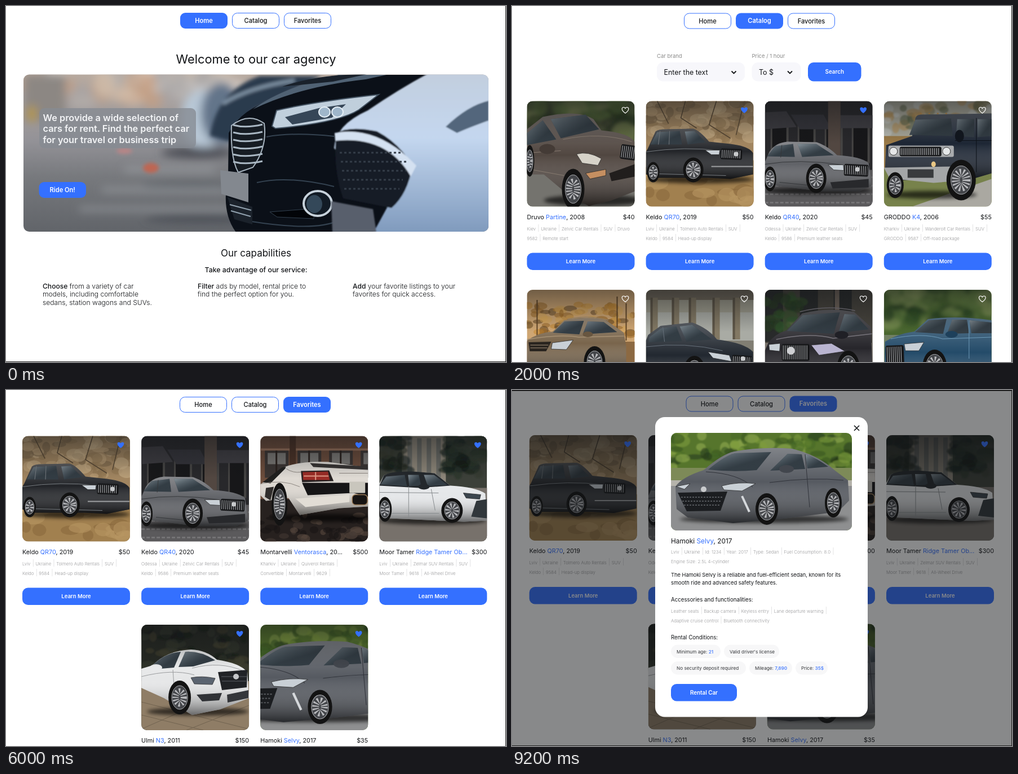
An HTML page that plays this animation: 887 px wide and 631 px high, repeating every 10000 ms.

```html
<!DOCTYPE html>
<html lang="en">
<head>
<meta charset="utf-8">
<title>Car agency</title>
<style>
html, body { margin: 0; width: 100%; height: 100%; overflow: hidden; background: #fff; }
svg { display: block; width: 100%; height: 100%; }
text { font-family: Inter, "Open Sans", sans-serif; fill: #121417; white-space: pre; }
.blue { fill: #3470ff; }
.white { fill: #fff; }
.grey { fill: #8a8a89; }
.tags { fill: #9a9a9c; font-weight: 300; }
.bar { fill: #d4d4d6; font-size: 11px; }
</style>
</head>
<body>
<svg id="stage" viewBox="0 0 887 631"></svg>
<script>
const BLUE = '#3470ff', INK = '#121417', STEP = 2000;

let seed = 7;
const rnd = () => (seed = seed * 16807 % 2147483647) / 2147483647;

// Basic shapes
const rect = (x, y, w, h, fill, r = 0, more = '') =>
  `<rect x="${x}" y="${y}" width="${w}" height="${h}" rx="${r}" fill="${fill}" ${more}/>`;
const path = (d, fill, more = '') => `<path d="${d}" fill="${fill}" ${more}/>`;
const line = (d, stroke, width = 1, more = '') =>
  path(d, 'none', `stroke="${stroke}" stroke-width="${width}" ${more}`);
const oval = (x, y, rx, ry, fill, more = '') =>
  `<ellipse cx="${x}" cy="${y}" rx="${rx}" ry="${ry}" fill="${fill}" ${more}/>`;
const text = (x, y, size, s, more = '') =>
  `<text x="${x}" y="${y}" font-size="${size}" ${more}>${s}</text>`;
const group = (s, more) => `<g ${more}>${s}</g>`;
const at = (x, y, s) => group(s, `transform="translate(${x} ${y})"`);
const soft = (s, b = 3) => group(s, `filter="url(#blur${b})"`);
const MID = 'text-anchor="middle" ', BOLD = 'font-weight="600" ', THIN = 'font-weight="300" ';

// Picture parts
const blobs = (n, x, y, w, h, size, colors) => Array.from({ length: n }, () =>
  oval(x + rnd() * w, y + rnd() * h, size * (.5 + rnd()), size * (.4 + rnd() * .6),
    colors[Math.floor(rnd() * colors.length)], 'opacity=".6"')).join('');
const body = (d, fill) => path(d, fill) + path(d, 'url(#shade)');
const wheel = (x, y, rx, ry) => oval(x, y, rx, ry, '#131313') +
  oval(x, y, rx * .7, ry * .7, '#44464a') +
  oval(x, y, rx * .36, ry * .36, 'none', `stroke="#b9babd" stroke-width="${rx * .55}" stroke-dasharray="2 2.6"`) +
  oval(x, y, rx * .7, ry * .7, 'none', 'stroke="#aaacb0"');
const slats = (x, y, w, h, tilt = 0, color = '#b5b7ba') => rect(x, y, w, h, '#17181a', 3, `transform="rotate(${tilt} ${x} ${y})"`) +
  line(`M${x + 2},${y + h / 2}h${w - 4}`, color, h - 5, `stroke-dasharray="1 2.5" transform="rotate(${tilt} ${x} ${y})"`);
const lamp = (d, fill = '#c9d0d6') => path(d, fill, 'stroke="#222" stroke-width=".7"');
const ground = (y, fill) => rect(0, y, 321, 187 - y, fill);
const shadow = (x, y, rx, ry = 7) => soft(oval(x, y, rx, ry, '#000', 'opacity=".65"'));
const glass = d => path(d, '#2b343b') + path(d, 'url(#shine)');

const sedan = rect(0, 0, 321, 173, '#56752c') +
  soft(blobs(90, 0, 0, 321, 62, 11, ['#7d9b3c', '#35551f', '#91aa50', '#476a27', '#263b1b']), 1) +
  rect(0, 62, 321, 34, '#7d8a58') + ground(92, '#8e8f90') + rect(0, 84, 321, 10, '#b5b3ab') +
  shadow(165, 153, 150) +
  body('M8,95Q20,78 58,66Q90,38 112,33Q160,24 215,28Q262,40 290,66L314,84L316,120L296,140L200,152L110,160L30,150L10,135Z', '#565a61') +
  glass('M66,65Q96,40 114,36L178,34L152,66Q110,70 66,65Z') +
  glass('M176,67L207,37L232,38L238,64Z') + glass('M242,63L238,38Q258,44 279,60Z') +
  line('M62,69Q120,72 145,96M175,88Q250,78 306,84M238,38L246,132', '#30333a') +
  lamp('M90,94Q120,86 150,90L126,103L94,101Z') + lamp('M9,95L34,90L24,100Z') +
  path('M12,106L100,104L88,138L28,139Z', '#1b1d20') +
  line('M18,114H92M20,121H90M23,128H87', '#53565a', 2, 'stroke-dasharray="3 2"') +
  oval(58, 100, 5, 5, '#c9cbcd') + line('M126,112L139,140', '#d5d8db', 4) +
  oval(205, 64, 13, 7, '#42464d') + wheel(170, 135, 20, 28) + wheel(288, 124, 15, 26);

const photos = {
  partine: rect(0, 0, 191, 187, '#4c5a36') +
    soft(blobs(35, 0, 0, 191, 60, 22, ['#23331c', '#58703a', '#2e3326', '#798052'])) +
    ground(120, '#74736e') + rect(0, 110, 191, 14, '#5d6341') + shadow(120, 176, 90, 10) +
    body('M0,50L28,28Q90,14 118,32L132,52Q180,56 191,72V160L150,176L110,186L78,170L30,130L0,130Z', '#514741') +
    glass('M42,32L104,24L128,50L60,66Z') + glass('M0,57L28,34L52,68L0,78Z') +
    line('M64,68Q130,54 186,72M0,92L60,88M0,120L66,132', '#877b70') +
    lamp('M88,94Q108,88 132,102L126,114L98,110Z', '#d6d2c8') + lamp('M104,128L140,121L140,132L112,138Z', '#c58f61') +
    slats(168, 76, 28, 26, 8) + path('M146,128L191,112V134L150,142Z', '#211e1d') +
    oval(36, 85, 14, 9, '#443b36') + wheel(82, 156, 20, 36) + wheel(5, 106, 8, 28),

  qr70: rect(0, 0, 191, 187, '#a18560') +
    blobs(65, 0, 0, 191, 72, 11, ['#bfa27b', '#7b6548', '#c7ae88', '#927753']) +
    line('M20,0L40,40M70,0L62,30L90,48M125,0L112,42L150,66M172,10L160,60', '#574733', 1.5) +
    ground(105, '#a1804f') + blobs(30, 0, 115, 191, 70, 15, ['#8a6a3e', '#b89663']) + shadow(96, 139, 95) +
    body('M3,85L17,54Q22,50 34,50L84,49Q95,52 112,72L150,76Q183,80 190,92V130L150,138L110,136L20,136L0,130V90Z', '#232529') +
    glass('M8,77L20,55L60,53L64,77Z') + glass('M69,54L86,53L106,73L74,77Z') +
    line('M25,53L22,77M42,53L41,77M0,90Q70,80 132,88M22,129L142,132', '#777c80') +
    lamp('M105,87L131,87L130,95L116,95Z') + slats(133, 84, 38, 19, 2) + oval(160, 94, 4, 4, '#c7c9cb') +
    line('M116,116H190', '#9d9fa1', 2) + wheel(13, 126, 11, 18) + wheel(84, 122, 18, 22),

  qr40: rect(0, 0, 191, 187, '#28282b') +
    [10, 58, 106, 154].map(x => rect(x, 42, 32, 68, '#454443') + rect(x + 3, 45, 25, 62, '#171719')).join('') +
    path('M0,20L38,18L56,46L0,50Z', '#3c3b40') + path('M46,24H104L118,50H62Z', '#34343a') + path('M122,25H191V48H132Z', '#3e3d42') +
    rect(112, 0, 22, 122, '#524741') + ground(122, '#5b5a5c') +
    line('M0,135H191M0,150H191M0,165H191M0,180H191', '#747375', 3, 'stroke-dasharray="6 3"') + shadow(95, 159, 95) +
    body('M0,108L8,90Q18,74 40,72L92,73Q112,80 128,96Q170,98 184,110L189,150L168,160L100,160L20,150L0,140Z', '#606267') +
    glass('M4,98L18,80L50,76L53,99Z') + glass('M58,76L91,76L122,96L66,99Z') +
    line('M0,112Q60,102 138,113M26,144L76,149M30,78L28,100', '#35373a') +
    lamp('M112,113L139,113L140,123L122,122Z') + slats(141, 111, 43, 21, 3) + oval(164, 121, 4, 4, '#c7c9cb') +
    path('M116,144L184,138V153L120,155Z', '#28292c') + wheel(9, 138, 11, 22) + wheel(91, 137, 18, 26),

  k4: rect(0, 0, 191, 187, '#aaa99b') +
    soft(blobs(60, 0, 0, 191, 58, 10, ['#7d7753', '#b08c51', '#596044', '#c3c6c3']), 1) +
    rect(0, 62, 191, 68, '#9a7a48') + ground(120, '#77824b') + path('M50,187L191,138V187Z', '#aaa8a1') + shadow(85, 166, 80) +
    body('M4,78L50,62L56,30Q58,24 66,24L191,22V128L150,140L20,140L2,120Z', '#1d2634') +
    glass('M45,60L56,33L119,31L122,62Z') + glass('M128,62L130,32L160,32V64Z') + glass('M166,64V32H191V62Z') +
    line('M64,22H118', '#c38b45', 2, 'stroke-dasharray="3 12"') + line('M126,70H191M164,30V126', '#0c1118') +
    rect(8, 79, 116, 20, '#a9abad', 3) + slats(28, 81, 74, 17, 0, '#d5d7d9') +
    [17, 111].map(x => oval(x, 89, 7, 7, '#e5e7e8', 'stroke="#333"')).join('') +
    path('M0,118L124,116L124,142L88,145L10,137Z', '#a4a6a7') + rect(42, 121, 46, 15, '#393b3d') +
    oval(88, 112, 4, 5, '#e9c684') + oval(134, 62, 8, 11, '#11161e') + wheel(20, 149, 15, 23) + wheel(137, 140, 26, 36),

  wagon: rect(0, 0, 191, 187, '#cfa673') +
    blobs(95, 0, 24, 191, 62, 8, ['#a06d2b', '#c78a35', '#6c4e28', '#d8a556']) + ground(92, '#8c6942') +
    line('M18,90V18M160,90V12M176,90V24', '#604526', 2) +
    body('M0,90Q20,76 46,74L66,54Q110,46 140,54L172,76L176,100V150H0Z', '#79654c') +
    glass('M46,76L67,56L101,55L93,79Z') + glass('M99,79L108,56L136,57L160,75Z') +
    line('M72,52Q110,44 144,54M0,88Q60,78 92,84L172,82', '#a69073', 1.5) +
    path('M3,93L43,92L34,109L5,109Z', '#29241f') + line('M6,98H38M6,103H36', '#a18e78') +
    lamp('M45,94L82,89L70,106L43,105Z') + oval(108, 79, 9, 5, '#685640') + wheel(120, 128, 19, 28),

  coast: rect(0, 0, 191, 187, '#9d9b8c') + rect(0, 40, 191, 50, '#a9aba4') + rect(0, 0, 191, 18, '#71695b') +
    [8, 46, 76, 118, 154].map(x => rect(x, 14, 13, 74, '#827863') + rect(x, 14, 4, 74, '#5d5547')).join('') +
    ground(90, '#817e73') +
    body('M4,80L26,64L82,58Q110,68 126,88Q175,94 190,110V187H0V90Z', '#222830') +
    glass('M6,84L27,68L54,65L64,91L5,93Z') + glass('M60,65L82,62L117,88L72,92Z') +
    line('M0,101Q70,92 136,108M30,66L33,92', '#67717b') + lamp('M110,110L148,116L152,127L119,121Z') +
    slats(153, 115, 36, 20, 4) + oval(172, 122, 4, 4, '#c8c9cb') + wheel(86, 144, 19, 27),

  street: rect(0, 0, 191, 187, '#46433c') + [0, 62, 122].map(x => rect(x, 0, 32, 92, '#282a2a')).join('') +
    soft(blobs(20, 0, 10, 65, 60, 12, ['#315329', '#58733b', '#263a21']), 1) + rect(124, 0, 8, 125, '#70645a') + ground(94, '#77716a') +
    body('M6,94Q18,78 38,72L66,42Q112,30 158,39L188,66L191,150V187H0V108Z', '#27262b') +
    glass('M39,73L67,45L133,40L122,78Z') + glass('M130,77L141,43L160,44L184,70Z') +
    line('M62,39Q110,26 160,37M20,88Q80,75 121,86L190,78', '#77747b', 1.5) +
    slats(30, 96, 49, 30, 0) + oval(46, 108, 7, 7, '#cfd0d3') + lamp('M82,98L118,95L142,109L96,116Z', '#b9b4d0') +
    lamp('M7,97L27,95L26,109L8,107Z') + oval(136, 80, 12, 7, '#202026') + wheel(148, 138, 20, 30),

  lake: rect(0, 0, 191, 187, '#49662f') +
    soft(blobs(60, 0, 0, 191, 72, 15, ['#668342', '#314e25', '#88995b', '#223a1d'])) + ground(80, '#718063') +
    body('M2,92Q24,78 54,74L78,52Q130,45 191,54V187H0Z', '#244b69') +
    glass('M55,75L80,54L111,52L105,78Z') + glass('M112,78L121,53L147,53L151,77Z') + glass('M155,77L152,54L191,58V77Z') +
    line('M12,87Q68,75 104,87L191,84M151,54V122', '#6e9ab8') + slats(3, 99, 32, 34, -2) +
    lamp('M36,96L71,93L62,108L38,108Z') + oval(120, 79, 11, 6, '#1e405b') + wheel(90, 134, 21, 28),

  ventorasca: rect(0, 0, 191, 187, '#6d4d3c') + rect(0, 22, 191, 4, '#9b735c') +
    [8, 66, 122, 178].map(x => rect(x, 26, 42, 48, '#3b3533') + rect(x + 5, 30, 32, 20, '#7a7875') + rect(x + 19, 26, 3, 48, '#2a211d')).join('') +
    rect(52, 0, 11, 80, '#4c3226') + ground(112, '#27211f') +
    blobs(45, 0, 140, 191, 47, 8, ['#413732', '#181514', '#57483e']) + shadow(110, 145, 90) +
    body('M0,86L40,56Q70,44 120,46L191,56V125L140,128L70,140L50,110L10,115L0,105Z', '#dcd7d0') +
    path('M4,82L38,56Q50,52 42,60L18,84Z', '#20201f') + path('M88,48L191,54V60L94,55Z', '#373433') +
    line('M0,85Q40,76 70,90M46,58Q58,66 72,64M140,66H191', '#8c8680') +
    path('M72,62L122,61L130,80L74,82Z', '#272121') + path('M75,64L120,63L123,78L76,78Z', '#9b2c26') +
    line('M77,71H121M98,64V78', '#e09986', 2) + path('M74,83H191V108L165,101L84,105Z', '#161516') +
    rect(158, 81, 28, 20, '#c9c6bd', 1) + rect(163, 104, 27, 18, '#171413', 6, 'stroke="#9c7c58" stroke-width="1.5"') +
    path('M62,111L158,104V117L80,126Z', '#e2ddd5') + path('M10,92L24,90L18,114L8,108Z', '#302d2c') + wheel(34, 121, 14, 38),

  ridge: rect(0, 0, 191, 187, '#3c4039') + rect(40, 0, 78, 85, '#8c8578') +
    [50, 67, 84, 101].map(x => rect(x, 4, 8, 74, '#696a65')).join('') +
    soft(blobs(40, 118, 0, 73, 68, 13, ['#141d18', '#27332a', '#30392d']) + blobs(22, 0, 0, 46, 65, 12, ['#17201b', '#34382b']), 1) +
    ground(92, '#77716b') + shadow(95, 150, 95) +
    body('M0,85L8,70Q20,64 60,64L98,66L126,88Q170,90 188,102L191,150L150,152L20,146L0,145Z', '#e5e7e9') +
    path('M0,88L8,70Q20,62 60,63L98,66L126,88L70,92Z', '#24282c') + glass('M2,86L12,72L45,69L49,89Z') + glass('M53,89L51,69L70,69L74,88Z') +
    glass('M79,69L97,69L121,87L86,89Z') + line('M0,100L105,101M52,90V144M92,94L99,132M22,137H106', '#878b8e') +
    lamp('M149,101L180,104L178,112L154,110Z', '#3b454d') + path('M172,115L191,112V146L163,143Z', '#31373b') +
    oval(79, 90, 10, 5, '#24282c') + wheel(10, 130, 12, 22) + wheel(129, 132, 19, 22),

  n3: rect(0, 0, 191, 187, '#262923') + soft(blobs(60, 0, 0, 191, 82, 12, ['#33372d', '#181c19', '#42412f']), 1) +
    ground(100, '#8f7d66') + line('M0,137L191,185M0,160L110,187M80,187L191,143M0,185L80,150', '#716350') + shadow(100, 154, 90) +
    body('M0,78L20,72Q45,46 88,44Q115,45 134,62Q175,68 188,84L191,130L140,150L90,160L40,130L0,112Z', '#e6e7e8') +
    glass('M20,72Q42,50 70,48L58,76L22,79Z') + glass('M66,75L78,48Q105,46 131,63L92,74Z') +
    line('M0,92Q55,78 94,89M56,80L59,126M90,77Q140,64 181,82', '#999b9d') +
    lamp('M88,94Q107,90 131,95L126,106L94,105Z', '#5b6470') + path('M136,84L188,80L187,111L143,116Z', '#202226') +
    line('M142,92H187M143,100H186', '#5b5f65') + oval(168, 92, 5, 5, '#c4c6c9') + path('M98,124L143,121L138,134L108,136Z', '#303236') +
    path('M152,124L190,116V130L153,138Z', '#34363a') + oval(26, 76, 11, 6, '#e8e9ea') + wheel(68, 129, 20, 30),

  selvy: group(sedan, 'transform="translate(-77.8) scale(1.08)"')
};

const hero = rect(31, 121, 825, 280, 'url(#road)') +
  soft(blobs(42, 40, 118, 350, 55, 25, ['#d8c6b4', '#c59f83', '#e5ddd5', '#a5a4a6']) +
    rect(31, 121, 75, 85, '#8c8783') + oval(46, 191, 9, 15, '#b59848') +
    oval(350, 200, 40, 52, '#b8c7d6') + oval(382, 190, 36, 55, '#63758a') +
    oval(340, 260, 65, 10, '#484c52') + oval(330, 320, 90, 7, '#555a60') + oval(345, 376, 100, 8, '#4c5057') +
    line('M170,326H390M130,360H400M210,290H370', '#aeb2b7', 4), 8) +
  soft(oval(257, 287, 14, 9, '#bd6653') + oval(210, 257, 14, 5, '#b98586') +
    path('M362,230Q374,151 450,124H560L440,185L397,240Z', '#2c3b4d') + line('M385,173Q430,144 512,132', '#8ca0b3', 5)) +
  path('M395,225Q418,181 478,165Q560,131 660,122H760L720,401H408Q381,365 394,302Z', '#0b1018') +
  path('M438,183Q520,143 638,130L675,122H590Q490,144 438,183Z', '#506274') +
  path('M490,143Q550,121 640,121L580,134Z', '#19212b') +
  path('M472,213L480,185Q550,169 661,157L626,184Q590,207 478,217Z', '#c0cfdc', 'stroke="#41505f" stroke-width="2"') +
  path('M495,197L555,181L603,174L578,198L508,210Z', '#364657') +
  [565, 588].map(x => oval(x, 188, 10, 9, '#9fb6ca', 'stroke="#e5eef5" stroke-width="2"')).join('') +
  path('M400,212Q430,188 458,208Q464,250 438,286L412,295Q398,270 400,212Z', '#161c23', 'stroke="#a8b5c0" stroke-width="2"') +
  [211, 224, 237, 250, 263, 276].map(y => line(`M403,${y}Q425,${y + 6} 455,${y - 1}`, '#a9b7c3', 3)).join('') +
  line('M462,232Q510,223 582,231M445,313Q500,300 582,320M436,382Q550,400 590,380', '#344250', 2) +
  path('M380,291L430,297V348L382,333Z', '#83888f') +
  path('M393,339L437,356V387L405,378Z', '#1b222b') + line('M397,352L435,362M399,363L434,373', '#92a2af', 2) +
  path('M468,365L546,359V377L481,374Z', '#020408', 'stroke="#33414f"') +
  oval(553, 350, 25, 22, '#121b25', 'stroke="#c7d2db" stroke-width="4"') + oval(547, 351, 14, 16, '#344859') +
  soft(path('M582,252Q584,211 642,185Q696,148 750,119H860V405H650L680,350Z', 'url(#pearl)') +
    path('M586,225Q610,212 658,222Q698,243 721,283Q713,333 684,358L598,341Q579,286 586,225Z', '#171d25') +
    path('M583,225Q660,211 728,283L718,302Q676,229 584,239Z', '#d4e1f1') +
    path('M780,214Q820,176 856,168V203Q820,216 800,225Z', '#52667c') +
    path('M577,346L651,360L657,401H579Z', '#595f6c'), 1) +
  line('M592,260H704M594,276H711M596,292H709M598,308H704M600,324H698', '#343d48', 3, 'stroke-dasharray="4 4"');

// Page parts
const button = (x, y, w, h, label, size, fill = BLUE, r = 10) =>
  rect(x, y, w, h, fill, r) + text(x + w / 2, y + h / 2 + size * .36, size, label, MID + BOLD + 'class="white"');
const nav = (x, y, active) => ['Home', 'Catalog', 'Favorites'].map((label, i) => {
  const left = x + i * 92;
  return i === active ? button(left, y, 84, 28, label, 11.1, BLUE, 9) :
    rect(left + .5, y + .5, 83, 27, '#fff', 9, `stroke="${BLUE}"`) +
    text(left + 42, y + 18, 11.1, label, MID + 'font-weight="500"');
}).join('');
const tags = (x, y, size, s) => text(x, y, size, s.split('|').map((tag, i) => i ?
  `<tspan class="bar" dx="3">|</tspan><tspan dx="2.5">${tag}</tspan>` : tag).join(''), 'class="tags"');

const heart = liked => path('M0,5.5C-8,0 -6.5,-5 -3,-5Q-1,-5 0,-3Q1,-5 3,-5C6.5,-5 8,0 0,5.5Z',
  liked ? BLUE : 'none', liked ? '' : 'stroke="#fff" stroke-width="1.2"');
const name = (brand, model, rest) => `${brand} <tspan class="blue">${model}</tspan>${rest}`;

const cars = {
  partine: ['Druvo', 'Partine', ', 2008', 40, 'Kiev|Ukraine|Zelvic Car Rentals|SUV|Druvo', '9582|Remote start'],
  qr70: ['Keldo', 'QR70', ', 2019', 50, 'Lviv|Ukraine|Tolmero Auto Rentals|SUV|', 'Keldo|9584|Head-up display'],
  qr40: ['Keldo', 'QR40', ', 2020', 45, 'Odessa|Ukraine|Zelvic Car Rentals|SUV|', 'Keldo|9586|Premium leather seats'],
  k4: ['GRODDO', 'K4', ', 2006', 55, 'Kharkiv|Ukraine|Wanderolt Car Rentals|SUV|', 'GRODDO|9587|Off-road package'],
  ventorasca: ['Montarvelli', 'Ventorasca', ', 20...', 500, 'Kharkiv|Ukraine|Quiverol Rentals|', 'Convertible|Montarvelli|9629|'],
  ridge: ['Moor Tamer', 'Ridge Tamer Ob...', '', 300, 'Lviv|Ukraine|Zelmar SUV Rentals|SUV|', 'Moor Tamer|9618|All-Wheel Drive'],
  n3: ['Ulmi', 'N3', ', 2011', 150, '', ''],
  selvy: ['Hamoki', 'Selvy', ', 2017', 35, '', '']
};
const card = (x, y, id, liked = true) => {
  const [brand, model, rest, price, top, low] = cars[id] || [];
  return at(x, y, `<use href="#${id}"/>` + at(174.5, 16, heart(liked)) + (brand ?
    text(0, 209, 10.8, name(brand, model, rest)) + text(191, 209, 10.8, '$' + price, 'text-anchor="end"') +
    tags(0, 229, 7.8, top) + tags(0, 246, 7.8, low) + button(0, 269, 191, 30.5, 'Learn More', 9.5) : ''));
};
const cross = (x, y, r, color) => line(`M${x - r},${y - r}l${2 * r},${2 * r}m0,${-2 * r}l${-2 * r},${2 * r}`, color, 1.6);
const select = (x, y, w, label, value, filled) =>
  text(x, y - 8, 9.5, label, 'class="grey"') + rect(x, y, w, 33.5, '#f7f7fb', 11) +
  text(x + 12.5, y + 21.5, 12.4, value) + (filled ? cross(x + w - 34, y + 17, 3, '#bbb') : '') +
  line(`M${x + w - 23.5},${y + 15.5}l4,4l4,-4`, INK, 1.8);
const search = (x, y, brand, price, filled) => select(x, y, 156, 'Car brand', brand, filled) +
  select(x + 168.5, y, 87, 'Price / 1 hour', price, filled) +
  button(x + 268, y, 94.5, 33.5, 'Search', 9.8, filled ? '#0b44cd' : BLUE);

const COLUMN = 211.1;
const row = (x, y, ids, likes = [1, 1, 1, 1]) => ids.map((id, i) => card(x + i * COLUMN, y, id, likes[i])).join('');
const favorites = (x, y) => row(x, y, ['qr70', 'qr40', 'ventorasca', 'ridge']) +
  row(x + COLUMN, y + 334.5, ['n3', 'selvy']);
const rightEdge = rect(886, 0, 1, 631, '#222'), bottomEdge = rect(0, 630, 887, 1, '#222');

const lead = (x, first, ...lines) => lines.map((s, i) => text(x, 501 + i * 14.3, 12.1,
  i ? s : `<tspan font-weight="500">${first}</tspan>${s}`, THIN)).join('');
const pill = (x, y, w, label, value = '') => rect(x, y, w, 23.5, '#f7f7f8', 11.75) +
  text(x + 10, y + 15, 8.2, `${label}<tspan class="blue" font-weight="600">${value}</tspan>`, 'fill-opacity=".85"');

const modal = rect(254, 48, 377, 531.5, '#fff', 17) + cross(611.5, 67.5, 4.5, INK) +
  at(282, 76, group(sedan, 'clip-path="url(#wide)"')) +
  text(282, 271.5, 11.8, name('Hamoki', 'Selvy', ', 2017')) +
  tags(282, 290, 7.9, 'Lviv|Ukraine|Id: 1234|Year: 2017|Type: Sedan|Fuel Consumption: 8.0|') +
  tags(282, 307, 7.9, 'Engine Size: 2.5L 4-cylinder') +
  text(282, 331, 9.3, 'The Hamoki Selvy is a reliable and fuel-efficient sedan, known for its') +
  text(282, 345, 9.3, 'smooth ride and advanced safety features.') +
  text(282, 375, 9.7, 'Accessories and functionalities:') +
  tags(282, 395, 7.9, 'Leather seats|Backup camera|Keyless entry|Lane departure warning|') +
  tags(282, 411.5, 7.9, 'Adaptive cruise control|Bluetooth connectivity') +
  text(282, 442, 9.7, 'Rental Conditions:') +
  pill(282, 451.5, 88, 'Minimum age: ', '21') + pill(376, 451.5, 98, "Valid driver's license") +
  pill(282, 481, 133, 'No security deposit required') + pill(421, 481, 76, 'Mileage: ', '7,890') + pill(503, 481, 57, 'Price: ', '35$') +
  button(282, 521, 117, 30.5, 'Rental Car', 9.8);

const pages = [
  nav(309, 12, 0) + text(443.5, 102, 21.9, 'Welcome to our car agency', MID) +
    group(hero, 'clip-path="url(#banner)"') + rect(59, 181, 278, 71, '#868b92', 9, 'opacity=".78"') +
    ['We provide a wide selection of', 'cars for rent. Find the perfect car', 'for your travel or business trip']
      .map((s, i) => text(65.5, 204 + i * 19.3, 16.3, s, BOLD + 'style="fill:#f3f4f6"')).join('') +
    button(58.5, 312, 83.5, 28, 'Ride On!', 11.1, BLUE, 9) +
    text(443.5, 443.5, 17, 'Our capabilities', MID) +
    text(443.5, 472, 12.3, 'Take advantage of our service:', MID + 'font-weight="500"') +
    lead(65, 'Choose', ' from a variety of car', 'models, including comfortable', 'sedans, station wagons and SUVs.') +
    lead(340, 'Filter', ' ads by model, rental price to', 'find the perfect option for you.') +
    lead(615, 'Add', ' your favorite listings to your', 'favorites for quick access.') + rightEdge + bottomEdge,
  nav(305, 12.5, 1) + search(257, 100, 'Enter the text', 'To $', false) +
    row(26.5, 168.5, ['partine', 'qr70', 'qr40', 'k4'], [0, 1, 1, 0]) +
    row(26.5, 503, ['wagon', 'coast', 'street', 'lake'], [0, 0, 0, 0]) + rightEdge,
  nav(307, 13, 1) + search(260, 101, 'Montarvelli', '500', true) + card(345.5, 169.5, 'ventorasca'),
  nav(308, 12, 2) + favorites(29, 81.5) + rightEdge,
  nav(308.5, 10.5, 2) + favorites(30.7, 80) + rect(0, 0, 887, 631, INK, 0, 'opacity=".5"') + modal +
    rect(0, 0, 887, 1.5, '#000') + rightEdge + bottomEdge
];

const fade = (id, stops, vertical = true) => `<linearGradient id="${id}" x2="${vertical ? 0 : 1}" y2="1">` +
  stops.map(([o, c, a = 1]) => `<stop offset="${o}" stop-color="${c}" stop-opacity="${a}"/>`).join('') + '</linearGradient>';
const clip = (id, x, y, w, h) => `<clipPath id="${id}">${rect(x, y, w, h, '#000', 10)}</clipPath>`;
const defs = fade('shade', [[0, '#fff', .25], [.45, '#fff', 0], [1, '#000', .55]]) +
  fade('shine', [[0, '#c3d0d8', .6], [.6, '#788994', .1]], false) +
  fade('veil', [[0, INK, .5], [.4, INK, 0]]) +
  fade('road', [[0, '#b7aaa0'], [.42, '#939297'], [.65, '#77797d'], [1, '#616469']]) +
  fade('pearl', [[0, '#c2cede'], [.4, '#c4d7ef'], [1, '#7e99bc']]) +
  [1, 3, 8].map(b => `<filter id="blur${b}" x="-20%" y="-50%" width="140%" height="200%"><feGaussianBlur stdDeviation="${b}"/></filter>`).join('') +
  clip('tile', 0, 0, 191, 187) + clip('wide', 0, 0, 321, 173) + clip('banner', 31, 121.5, 825, 278.5) +
  Object.entries(photos).map(([id, art]) =>
    group(art + rect(0, 0, 191, 187, 'url(#veil)'), `id="${id}" clip-path="url(#tile)"`)).join('');

const stage = document.getElementById('stage');
stage.innerHTML = `<defs>${defs}</defs>` + pages.map(p => group(p, 'class="page" display="none"')).join('');
const views = stage.querySelectorAll('.page');

function draw() {
  const current = Math.floor(performance.now() / STEP) % views.length;
  views.forEach((view, i) => view.setAttribute('display', i === current ? 'inline' : 'none'));
  requestAnimationFrame(draw);
}
draw();
</script>
</body>
</html>
```
